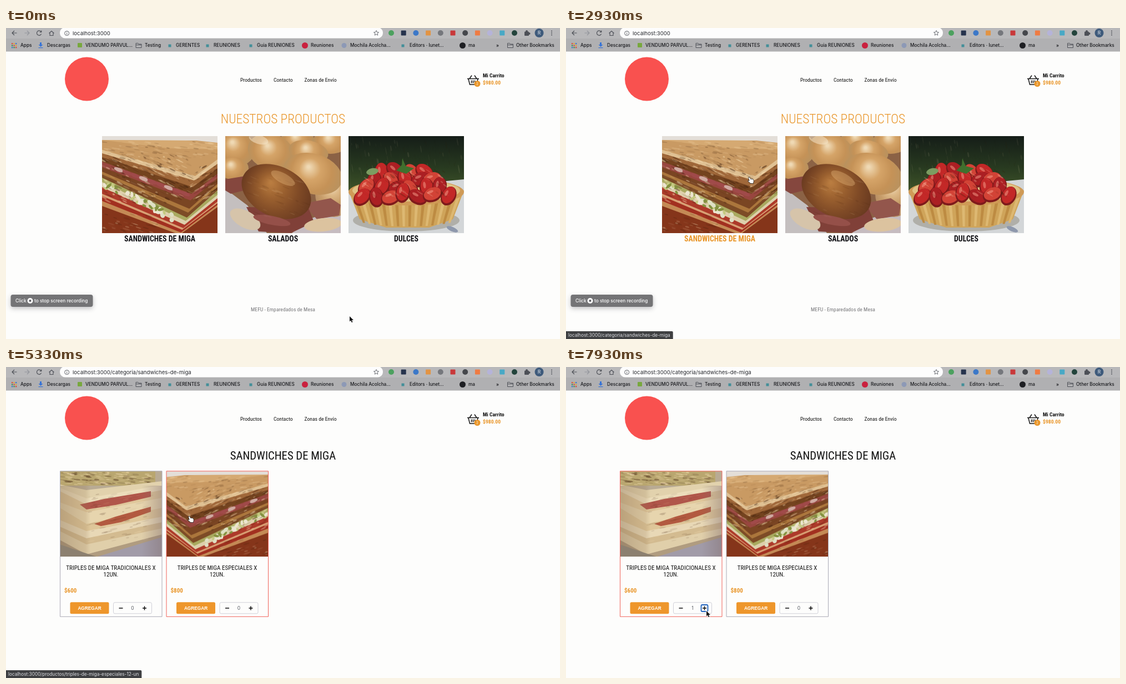
An HTML page with a canvas for the animation above (8 s loop, 998 px wide and 561 px high).

```html
<!DOCTYPE html>
<html lang="es">
<head>
<meta charset="utf-8">
<title>Tienda</title>
<style>
html, body { margin: 0; width: 100%; height: 100%; overflow: hidden; background: #fdfdfc; }
canvas { display: block; }
</style>
</head>
<body>
<canvas id="stage" width="998" height="561"></canvas>
<script>
const W = 998, H = 561, LOOP = 8000, TAU = Math.PI * 2;
const ctx = document.getElementById('stage').getContext('2d');
const UI = 'Inter, "Open Sans", sans-serif';
const SHOP = '"Roboto Condensed", Roboto, sans-serif';
const ORANGE = '#e9962a';

// Moments of the session, in ms
const OPEN = 4230, LOADED = 4730, CLICK = 7750;
const PATH = [
  [300, 619, 520], [1500, 332, 274], [5560, 332, 274], [6150, 262, 322],
  [6700, 248, 368], [7140, 249, 467], [7270, 249, 467], [7640, 253, 440]
];
const STATUS = [
  [0, ''], [950, 'categoria/salados'], [1250, 'categoria/sandwiches-de-miga'],
  [4930, 'productos/triples-de-miga-especiales-12-un'],
  [6000, 'productos/triples-de-miga-tradicionales-12-un'], [7330, '']
];

// Use a narrow face when there is one, otherwise narrow the regular one
function findSqueeze() {
  const width = (family, stretch) => {
    ctx.font = '100px ' + family;
    ctx.fontStretch = stretch;
    return ctx.measureText('Hamburgo SANDWICHES').width;
  };
  const ratio = width(SHOP, 'condensed') / width('Roboto, sans-serif', 'normal');
  return ratio > 0.96 ? 0.88 : 1;
}
const squeeze = findSqueeze();

function text(str, x, y, size, color, { weight = 400, family = UI, align = 'left' } = {}) {
  const narrow = family === SHOP;
  ctx.save();
  ctx.translate(x, y);
  if (narrow) ctx.scale(squeeze, 1);
  ctx.font = `${weight} ${size}px ${family}`;
  ctx.fontStretch = narrow ? 'condensed' : 'normal';
  ctx.textAlign = align;
  ctx.fillStyle = color;
  ctx.fillText(str, 0, 0);
  ctx.restore();
}
const shop = (str, x, y, size, color, weight = 400, align = 'left') =>
  text(str, x, y, size, color, { weight, family: SHOP, align });

function rect(x, y, w, h, color, r = 0, c = ctx) {
  c.fillStyle = color;
  c.beginPath();
  c.roundRect(x, y, w, h, r);
  c.fill();
}
function frame(x, y, w, h, color, r = 0, width = 1) {
  ctx.strokeStyle = color;
  ctx.lineWidth = width;
  ctx.beginPath();
  ctx.roundRect(x, y, w, h, r);
  ctx.stroke();
}
function oval(x, y, rx, ry, color, c = ctx, turn = 0) {
  c.fillStyle = color;
  c.beginPath();
  c.ellipse(x, y, rx, ry, turn, 0, TAU);
  c.fill();
}
const dot = (x, y, r, color) => oval(x, y, r, r, color);
function poly(points, color, c = ctx) {
  c.fillStyle = color;
  c.beginPath();
  points.forEach(([x, y]) => c.lineTo(x, y));
  c.closePath();
  c.fill();
}
function line(d, color, width = 1) {
  ctx.strokeStyle = color;
  ctx.lineWidth = width;
  ctx.stroke(new Path2D(d));
}

// Pictures, painted once
function random(seed) {
  return () => (seed = (seed * 16807) % 2147483647) / 2147483647;
}
function photo(w, h, paint, seed) {
  const cv = document.createElement('canvas');
  cv.width = w;
  cv.height = h;
  const c = cv.getContext('2d');
  c.rect(0, 0, w, h);
  c.clip();
  paint(c, random(seed), w, h);
  return cv;
}
function grain(c, rnd, n, x, y, w, h, slope, alpha) {
  for (let i = 0; i < n; i++) {
    const tone = rnd() < 0.5 ? '60,30,12' : '255,232,190';
    oval(x + rnd() * w, y + rnd() * h, 2 + rnd() * 6, 0.5 + rnd() * 1.2,
      `rgba(${tone},${alpha * rnd()})`, c, slope);
  }
}
// Each layer covers everything below its edge: colour, left, corner and right heights
function layers(c, w, h, corner, lean, list) {
  list.forEach(([color, left, mid, right], i) => {
    const x = corner - lean * i / (list.length - 1);
    poly([[0, left], [x, mid], [w, right], [w, h], [0, h]], color, c);
  });
}

const sandwich = photo(208, 175, (c, rnd, w, h) => {
  rect(0, 0, w, h, '#e3ded8', 0, c);
  layers(c, w, h, 170, 30, [
    ['#c99a63', 7, 8, 12], ['#e0c193', 25, 72, 42], ['#a0683a', 31, 80, 50],
    ['#74431f', 38, 92, 58], ['#98463f', 46, 104, 68], ['#7a4523', 56, 116, 76],
    ['#ab763c', 64, 131, 86], ['#7d4c26', 69, 138, 92], ['#a9aa60', 75, 147, 98],
    ['#ddd0ac', 83, 153, 106], ['#ad3a2a', 92, 160, 112], ['#d8a074', 104, 166, 118],
    ['#a23020', 108, 169, 121], ['#c48a55', 117, 174, 124], ['#85351a', 126, 178, 128]
  ]);
  poly([[0, 7], [150, 8], [208, 12], [208, 24], [120, 22]], 'rgba(225,185,130,.5)', c);
  grain(c, rnd, 110, 0, 10, w, 30, 0.15, 0.25);
  grain(c, rnd, 300, 0, 35, 160, 85, 0.45, 0.45);
  grain(c, rnd, 80, 160, 55, 48, 60, -0.5, 0.4);
  for (let i = 0; i < 9; i++) {
    const x = 30 + i * 15;
    oval(x, 50 + x * 0.36, 9, 3.5, i % 3 ? '#a04a4a' : '#d0aaa2', c, 0.4);
  }
  for (let i = 0; i < 36; i++) {
    const x = 4 + rnd() * 136;
    const tones = ['#dfe0c4', '#83913f', '#c4ca80', '#ece5d0'];
    oval(x, 77 + x * 0.5 + rnd() * 12, 3 + rnd() * 4, 2 + rnd() * 2.5, tones[i % 4], c, rnd() * 3);
  }
  grain(c, rnd, 60, 0, 140, 100, 35, 0.3, 0.3);
}, 11);

const classic = photo(184, 154, (c, rnd, w, h) => {
  rect(0, 0, w, h, '#b9ab94', 0, c);
  rect(0, 0, 172, 26, '#b9a66f', 0, c);
  grain(c, rnd, 150, 0, 2, 165, 22, 0.1, 0.4);
  layers(c, w, h, 48, 0, [
    ['#e2d2ad', 24, 34, 18], ['#ecddbb', 30, 49, 25], ['#dfc79b', 36, 60, 34],
    ['#e7d5ae', 56, 74, 48], ['#dec699', 66, 95, 66], ['#e8d8b6', 88, 108, 82],
    ['#d3bb90', 100, 121, 92], ['#e0cfaa', 108, 132, 103], ['#b09c80', 124, 150, 114],
    ['#a19ba8', 137, 160, 119]
  ]);
  poly([[36, 60], [80, 50], [164, 36], [164, 46], [100, 61], [48, 69]], '#b0564a', c);
  poly([[62, 95], [100, 82], [164, 64], [164, 73], [110, 92], [74, 99]], '#b25a40', c);
  const shade = c.createLinearGradient(0, 0, w, 0);
  shade.addColorStop(0, 'rgba(125,100,75,.38)');
  shade.addColorStop(0.25, 'rgba(145,115,80,.2)');
  shade.addColorStop(0.3, 'rgba(145,115,80,0)');
  shade.addColorStop(0.8, 'rgba(130,110,110,0)');
  shade.addColorStop(1, 'rgba(130,110,110,.45)');
  rect(0, 26, w, 128, shade, 0, c);
  poly([[0, 132], [50, 149], [66, 154], [0, 154]], '#8c8070', c);
  grain(c, rnd, 110, 50, 40, 115, 90, -0.2, 0.15);
}, 23);

const buns = photo(208, 175, (c, rnd, w, h) => {
  rect(0, 0, w, h, '#8b6245', 0, c);
  poly([[0, 95], [40, 125], [75, 175], [0, 175]], '#c4bfbf', c);
  poly([[208, 130], [150, 150], [120, 175], [208, 175]], '#c6bcc0', c);
  const bun = (x, y, rx, ry, tones, turn = 0) => {
    const g = c.createRadialGradient(x - rx * 0.15, y - ry * 0.35, 2, x, y, rx);
    tones.forEach((tone, i) => g.addColorStop(i / (tones.length - 1), tone));
    oval(x, y, rx, ry, g, c, turn);
  };
  const pale = ['#efd9b4', '#d5a468', '#c59257', '#b8925f'];
  bun(130, 6, 30, 18, pale);
  bun(190, 10, 32, 22, pale);
  bun(18, 22, 36, 32, pale, 0.3);
  bun(14, 58, 28, 20, pale);
  bun(82, 28, 42, 32, pale, 0.3);
  bun(150, 28, 36, 20, pale, 0.2);
  bun(196, 104, 34, 42, ['#f0dcc0', '#dcb887', '#c79d6a', '#b98f64']);
  bun(158, 68, 54, 36, pale, 0.3);
  oval(60, 6, 18, 8, 'rgba(250,235,210,.5)', c, 0.3);
  poly([[0, 78], [36, 72], [44, 84], [34, 98], [10, 104], [0, 98]], '#85473e', c);
  poly([[140, 122], [190, 112], [208, 124], [205, 143], [165, 150]], '#93564c', c);
  poly([[38, 128], [150, 130], [160, 155], [118, 175], [60, 172]], '#804038', c);
  oval(36, 150, 30, 15, '#d6c4aa', c, 0.5);
  oval(176, 160, 34, 12, '#dcc39f', c, -0.1);
  bun(92, 100, 66, 45, ['#b97c40', '#9a602f', '#7f4a26', '#693a20'], 0.45);
  oval(104, 76, 24, 9, 'rgba(235,190,130,.35)', c, 0.5);
  oval(84, 152, 34, 8, '#955049', c, 0.2);
  grain(c, rnd, 60, 40, 75, 110, 70, 0.4, 0.12);
}, 37);

const tart = photo(208, 175, (c, rnd, w, h) => {
  const back = c.createLinearGradient(0, 0, 0, 95);
  back.addColorStop(0, '#151d18');
  back.addColorStop(0.6, '#283a20');
  back.addColorStop(1, '#3d5128');
  rect(0, 0, w, h, back, 0, c);
  grain(c, rnd, 80, 0, 0, w, 70, 1.4, 0.1);
  poly([[0, 98], [208, 78], [208, 175], [0, 175]], '#d3d6d8', c);
  oval(104, 152, 96, 20, '#b0afa9', c);
  poly([[0, 98], [208, 98], [188, 150], [145, 165], [68, 165], [20, 150]], '#cfa45a', c);
  for (let i = 0; i < 16; i++) {
    const x = 10 + i * 12.5;
    const foot = 104 + (x - 104) * 0.82;
    const sag = 13 * Math.sqrt(1 - ((x - 104) / 108) ** 2);
    poly([[x - 2, 108], [x + 4, 108], [foot + 3, 150 + sag], [foot - 1, 150 + sag]],
      i % 2 ? '#ddb872' : '#bd8b42', c);
  }
  oval(104, 101, 104, 24, '#cf9a56', c);
  oval(104, 98, 97, 20, '#dfc284', c);
  for (let row = 0; row < 4; row++) {
    const n = 4 + row;
    for (let i = 0; i < n; i++) {
      const x = 100 + (i - (n - 1) / 2) * 26 + (rnd() - 0.5) * 8;
      const y = 64 + row * 14 + (rnd() - 0.5) * 9;
      const turn = rnd() * 3;
      oval(x, y + 1, 18, 13, '#7f1a1b', c, turn);
      oval(x, y - 1, 16, 11, ['#c32827', '#ab1f23', '#d24336'][(i + row) % 3], c, turn);
      oval(x - 4, y - 4, 6, 2.5, 'rgba(245,160,140,.5)', c, turn);
    }
  }
  grain(c, rnd, 70, 25, 60, 155, 50, 0.6, 0.3);
  oval(43, 64, 11, 6, '#7c9c61', c, -0.2);
  poly([[86, 62], [96, 52], [97, 40], [103, 54], [118, 58], [104, 68]], '#40702e', c);
  oval(187, 168, 11, 4, '#8e98ac', c, 0.4);
}, 51);

// Browser chrome
function folder(x, y) {
  line(`M${x - 5} ${y - 4}h4l1 1.5h5v6.5h-10zM${x - 5} ${y - 1}h10`, '#50535a', 1);
}
function chrome(t) {
  rect(0, 0, W, 42.5, '#b0b0b2');
  rect(0, 0, W, 19, '#b8b8ba');
  rect(97, -1, 582, 19.5, '#fdfdfd', 9.5);
  const ink = '#4d5057';
  line('M19.5 9h-8M15 5l-4 4 4 4', ink, 1.2);
  line('M33.5 9h8M38 5l4 4-4 4', '#92949b', 1.2);
  line('M63.2 6.8a4.2 4.2 0 1 0 .4 3.8M63.7 4.5v3h-3', ink, 1.2);
  line('M77.5 9.5l4.5-4 4.5 4M79 8.5v5h6v-5', ink, 1.1);
  line('M105.7 9.5a4 4 0 1 0 8 0a4 4 0 1 0-8 0M109.7 9v2.8M109.7 7v1', '#5c5f66', 1);
  line('M667 4.5l1.3 3 3.2.3-2.5 2.1.8 3.2-2.8-1.7-2.8 1.7.8-3.2-2.5-2.1 3.2-.3z', '#5c5f66', 0.9);
  text('localhost:3000' + (t >= LOADED ? '/categoria/sandwiches-de-miga' : ''), 120, 12.7, 9.6, '#25272c');

  const marks = ['#4ca15f', '#26334d', '#3c78c8', '#e29444', '#75777c', '#c8383a',
    '#45474c', '#ef7b43', '#b5b3d9', '#48a9c5', '#23443c'];
  marks.forEach((color, i) => {
    const x = 694 + i * 22.2;
    if (i % 2) rect(x - 4.5, 4.5, 9, 9, color, 1);
    else dot(x, 9, 5, color);
  });
  rect(934, 6.5, 8, 7.5, ink, 1);
  dot(938, 6, 2, ink);
  dot(942.5, 10, 2, ink);
  dot(960.5, 9, 8, '#3f5b7c');
  text('R', 960.5, 12, 8.5, '#e8edf2', { align: 'center' });
  for (let i = -1; i < 2; i++) dot(983, 9 + i * 3.5, 1, ink);

  for (let i = 0; i < 9; i++) {
    rect(10 + (i % 3) * 3.5, 27 + Math.floor(i / 3) * 3.5, 2.3, 2.3,
      ['#d94b3d', '#dfa42b', '#3f74c9', '#3d9453'][i % 4]);
  }
  poly([[61, 26], [64, 26], [64, 30], [66.5, 30], [62.5, 34], [58.5, 30], [61, 30]], '#3773d6');
  rect(58.5, 35, 8, 1.2, '#3773d6');
  rect(129, 27, 8, 8, '#78a83e', 1);
  folder(239, 31.5);
  [295, 363, 441, 715].forEach(x => rect(x - 2.5, 29.5, 5, 5, '#438f99'));
  dot(538.5, 31.5, 5.5, '#c9213f');
  dot(609, 31.5, 4.5, '#8d99b6');
  dot(822.5, 31.5, 5.5, '#1e1f23');
  folder(908.5, 31.5);
  const labels = {
    Apps: 26, Descargas: 74, 'VENDUMO PARVUL...': 143, Testing: 250, GERENTES: 306,
    REUNIONES: 374, 'Guia REUNIONES': 452, Reuniones: 549, 'Mochila Acolcha...': 620,
    'Editors · lunet...': 727, ma: 833, '»': 883, 'Other Bookmarks': 919
  };
  for (const [label, x] of Object.entries(labels)) text(label, x, 34.3, 8.25, '#17181c', { weight: 500 });
}

function header() {
  dot(145.5, 92, 39.5, '#f9514f');
  shop('Productos', 422, 97, 9.66, '#111');
  shop('Contacto', 482, 97, 9.66, '#111');
  shop('Zonas de Envío', 537.5, 97, 9.66, '#111');
  line('M831 91.5h21M833 92l2.5 10h12l2.5-10M835 91.5l4-6M848 91.5l-4-6M838.5 94.5v5M841.5 94.5v5M844.5 94.5v5',
    '#151515', 1.5);
  dot(849, 100.5, 5.5, ORANGE);
  shop('2', 849, 103, 7, '#fff0d8', 400, 'center');
  shop('Mi Carrito', 859, 89.2, 9.66, '#111', 700);
  shop('$980.00', 859, 101.5, 9.66, ORANGE, 700);
}
const footer = y => shop('MEFU - Emparedados de Mesa', 499, y, 9.66, '#77777a', 400, 'center');
const inside = (p, x, y, w, h) => p.x >= x && p.x < x + w && p.y >= y && p.y < y + h;

function home(p) {
  shop('NUESTROS PRODUCTOS', 499, 171.5, 23.4, ORANGE, 300, 'center');
  let link = false;
  [[sandwich, 'SANDWICHES DE MIGA'], [buns, 'SALADOS'], [tart, 'DULCES']].forEach(([img, name], i) => {
    const x = 173 + i * 222;
    const over = inside(p, x, 195, 208, 193);
    link = link || over;
    ctx.drawImage(img, x, 195, 208, 175);
    shop(name, x + 104, 384.5, 13.8, over ? ORANGE : '#101014', 700, 'center');
  });
  footer(511.3);
  return link;
}

function card(x, img, flip, kind, price, count, over, focus) {
  const mid = x + 92;
  ctx.save();
  ctx.translate(flip ? x + 184 : x, 188);
  ctx.scale(flip ? -1 : 1, 1);
  ctx.drawImage(img, 0, 0, 184, 154);
  ctx.restore();
  frame(x + 0.5, 187.8, 183.5, 262.5, over ? '#f0635a' : '#aaa9b5');
  shop(`TRIPLES DE MIGA ${kind} X`, mid, 366, 11.04, '#111', 400, 'center');
  shop('12UN.', mid, 378.4, 11.04, '#111', 400, 'center');
  shop(price, x + 8, 406.8, 11.04, ORANGE, 700);
  rect(x + 18.5, 424.3, 70, 21, '#ee962b', 2.5);
  text('AGREGAR', x + 53.5, 437.6, 8.28, '#fff',
    { weight: 700, family: '"Liberation Sans", Arial, sans-serif', align: 'center' });
  frame(x + 96.5, 424.8, 69, 20, '#d0d0d8', 2.5);
  line(`M${x + 106.5} 435h7M${x + 149} 435h7M${x + 152.5} 431.5v7`, '#111', 1.6);
  text(count, x + 131, 438, 8.5, '#555960', { align: 'center' });
  if (focus) frame(x + 146.5, 429, 12, 12, '#1f62bd', 2, 1.8);
}

function category(t, p) {
  shop('SANDWICHES DE MIGA', 499, 167, 20.7, '#111', 400, 'center');
  if (t < LOADED) {
    shop('NO HAY PRODUCTOS', 93.5, 202.3, 9.66, '#77777a');
    footer(333.5);
    return true;
  }
  const first = inside(p, 97, 188, 184, 262);
  const second = inside(p, 289, 188, 184, 262);
  const clicked = t >= CLICK;
  card(97, classic, false, 'TRADICIONALES', '$600', clicked ? '1' : '0', first, clicked);
  card(288.5, sandwich, true, 'ESPECIALES', '$800', '0', second, false);
  return (first || second) && p.y < 385;
}

function recorder(t) {
  ctx.save();
  ctx.globalAlpha = Math.max(0, Math.min(1, (4300 - t) / 150));
  ctx.shadowColor = 'rgba(60,60,70,.3)';
  ctx.shadowBlur = 8;
  ctx.shadowOffsetY = 3;
  rect(8.5, 481, 148, 22, '#747476', 4);
  ctx.shadowColor = 'transparent';
  text('Click', 17, 494.8, 8.25, '#fff', { weight: 500 });
  dot(43.5, 492, 5, '#fff');
  rect(41.7, 490.2, 3.6, 3.6, '#5b5b60', 0.5);
  text('to stop screen recording', 51, 494.8, 8.25, '#fff', { weight: 500 });
  ctx.restore();
}

function status(t) {
  const path = STATUS.filter(s => s[0] <= t).pop()[1];
  if (!path) return;
  const url = 'localhost:3000/' + path;
  ctx.font = '8.25px ' + UI;
  ctx.fontStretch = 'normal';
  rect(0, 547, ctx.measureText(url).width + 9, 14, '#3f4042', [0, 2, 0, 0]);
  text(url, 4, 557, 8.25, '#dcdde2');
}

function pointerAt(t) {
  const i = PATH.findIndex(k => k[0] > t);
  if (i <= 0) {
    const [, x, y] = i ? PATH[PATH.length - 1] : PATH[0];
    return { x, y };
  }
  const a = PATH[i - 1], b = PATH[i];
  const u = (t - a[0]) / (b[0] - a[0]);
  const e = u * u * (3 - 2 * u);
  return { x: a[1] + (b[1] - a[1]) * e, y: a[2] + (b[2] - a[2]) * e };
}
function cursor(p, hand) {
  const shape = new Path2D(hand
    ? 'M-3-4q1.2-1.2 2 0l1.5 3 1-.5 1 .4 1-.2 1 .6.8.4q1 2 .3 4l-.5 2.3h-4.5l-4.2-3.5q-.5-1.3 1-1l1.2.5z'
    : 'M0 0v9.5l2.2-2 1.6 3.7 1.7-.7-1.6-3.6h3.1z');
  ctx.save();
  ctx.translate(p.x, p.y);
  ctx.lineJoin = 'round';
  ctx.strokeStyle = hand ? '#222' : '#fff';
  ctx.lineWidth = hand ? 1.4 : 1.6;
  ctx.stroke(shape);
  ctx.fillStyle = hand ? '#fff' : '#111';
  ctx.fill(shape);
  ctx.restore();
}

function draw(t) {
  const p = pointerAt(t);
  rect(0, 0, W, H, '#fdfdfc');
  chrome(t);
  header();
  const link = t < OPEN ? home(p) : category(t, p);
  if (t < 4300) recorder(t);
  status(t);
  cursor(p, link);
}
const start = performance.now();
function tick() {
  draw((performance.now() - start) % LOOP);
  requestAnimationFrame(tick);
}
tick();
</script>
</body>
</html>
```
